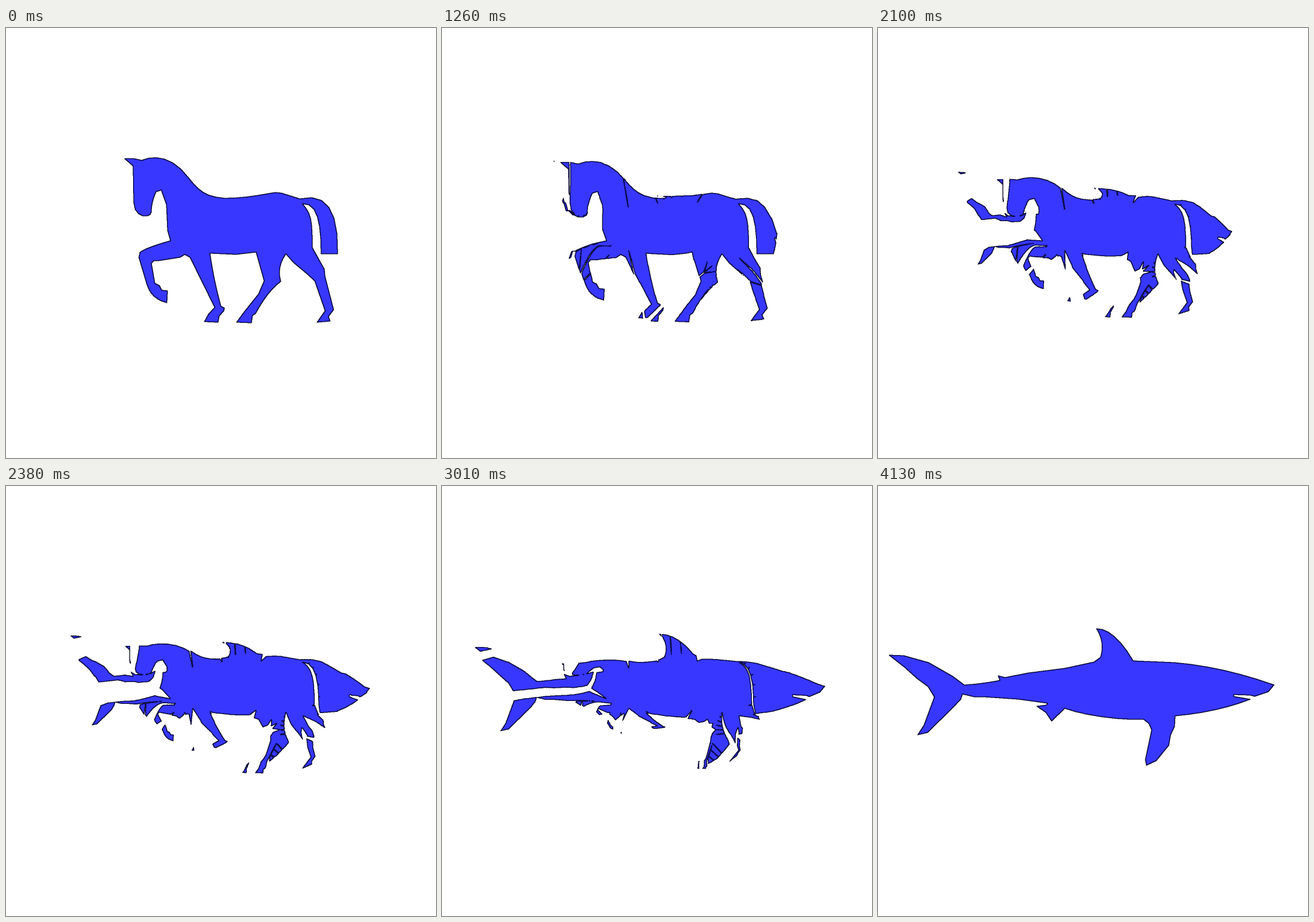
Recreate the animation shown at these times as an HTML page with a canvas. Size 748x748 px, loop 4830 ms.

```html
<!DOCTYPE html>
<html>
<head>
<meta charset="utf-8">
<style>
html, body { margin: 0; width: 100%; height: 100%; overflow: hidden; background: #fff; }
canvas { position: absolute; left: 8px; top: 215px; width: 692px; height: 306px; }
</style>
</head>
<body>
<canvas id="stage" width="1384" height="612"></canvas>
<script>
// Outlines as SVG-style paths in stage pixels
const horseBack = `M206 227 222 227 236 230 C259 220 291 224 318 261 C336 284 347 293 380 296
  C420 296 452 288 469 286 L479 287 511 297 C556 286 579 315 577 393 L548 393
  C548 337 541 304 516 306 C531 323 533 334 533 382`;
const horseHindLegs = `L554 420 555 432 570 490 561 502 564 510 541 512 555 492 537 440 524 428
  500 408 487 393 Q471 415 478 441 Q455 458 434 497 L429 500 427 513 401 512 415 493 439 463
  449 440 435 390 400 394 355 392`;
const horseForelegs = `Q361 436 374 484 L380 487 379 492 371 501 369 512 345 511 352 498 363 486
  320 399 311 394 303 399 265 405 257 405 253 409 259 444 267 448 271 456 281 457 280 478
  Q253 472 245 446 L231 399 233 390 Q246 381 286 370`;
const horseHead = 'L281 352 279 307 270 282 261 285 Q253 303 253 320 C253 331 223 333 222 303 L221 240';
const sharkBack = `M19 294 45 295 88 307 130 331 150 346 Q182 344 212 338 L209 330 221 333 262 325
  325 317 376 306 387 298 Q395 272 380 248 Q411 248 444 304 L515 307 Q600 314 689 346`;
const sharkBelly = `L679 358 655 366 648 364 619 363 619 366 648 371 Q588 394 517 400
  L516 418 509 433 506 451 484 478 467 486 465 476 476 424 471 413 462 406
  C420 408 358 399 325 387 L302 409 292 394 276 383 293 381 295 378 244 371 185 367 168 367 147 362`;
const sharkTail = 'L144 371 130 386 86 429 69 433 80 416 98 367 87 349 68 335 47 316';

const SCALE = 2, LEFT = 8, TOP = 215, TILE = 16, FACETS = 6;
const ctx = stage.getContext('2d', { willReadFrequently: true });
const W = stage.width, H = stage.height;

const rgb = (r, g, b) => (255 << 24 | b << 16 | g << 8 | r) >>> 0;
const WHITE = rgb(255, 255, 255), BLUE = rgb(55, 55, 255);
const LINE_IN = rgb(5, 5, 75), LINE_OUT = rgb(35, 35, 45);

// Point of a Bezier curve of any degree
function bezier(pts, u) {
  if (pts.length === 1) return pts[0];
  const next = pts.slice(1).map(([x, y], i) =>
    [pts[i][0] + (x - pts[i][0]) * u, pts[i][1] + (y - pts[i][1]) * u]);
  return bezier(next, u);
}

// Path text to grid points, with every curve cut into facets
function flatten(path) {
  const out = [];
  for (const [part] of path.matchAll(/[MLQC][^MLQC]*/g)) {
    const nums = part.match(/\d+/g).map(Number), pts = [];
    for (let i = 0; i < nums.length; i += 2)
      pts.push([(nums[i] - LEFT) * SCALE - .5, (nums[i + 1] - TOP) * SCALE - .5]);
    if ('ML'.includes(part[0])) out.push(...pts);
    else {
      const curve = [out.at(-1), ...pts];
      for (let k = 1; k <= FACETS; k++) out.push(bezier(curve, k / FACETS));
    }
  }
  return out;
}

// Closest point to (x, y) on a segment: [x, y, squared distance]
function closest([x1, y1, x2, y2], x, y) {
  const dx = x2 - x1, dy = y2 - y1;
  const u = Math.max(0, Math.min(1, ((x - x1) * dx + (y - y1) * dy) / (dx * dx + dy * dy)));
  const cx = x1 + u * dx, cy = y1 + u * dy;
  return [cx, cy, (x - cx) ** 2 + (y - cy) ** 2];
}

// Grid of inside flags and nearest outline points
function makeShape(path) {
  const pts = flatten(path);
  const sides = pts.map((p, i) => [...p, ...pts[(i + 1) % pts.length]]);

  ctx.clearRect(0, 0, W, H);
  ctx.beginPath();
  for (const [x, y] of pts) ctx.lineTo(x + .5, y + .5);
  ctx.fill();
  const inside = new Uint8Array(W * H), data = ctx.getImageData(0, 0, W, H).data;
  for (let i = 0; i < W * H; i++) inside[i] = data[i * 4 + 3] > 127 ? 1 : 0;

  const nx = new Float32Array(W * H), ny = new Float32Array(W * H);
  for (let ty = 0; ty < H; ty += TILE) for (let tx = 0; tx < W; tx += TILE) {
    // Only sides that can be nearest somewhere in this tile
    const dist = sides.map(s => Math.sqrt(closest(s, tx + TILE / 2, ty + TILE / 2)[2]));
    const limit = Math.min(...dist) + TILE * 1.5;
    const near = sides.filter((s, i) => dist[i] <= limit);
    for (let y = ty; y < Math.min(H, ty + TILE); y++)
      for (let x = tx; x < Math.min(W, tx + TILE); x++) {
        let best = Infinity;
        const i = y * W + x;
        for (const s of near) {
          const c = closest(s, x, y);
          if (c[2] < best) { best = c[2]; nx[i] = c[0]; ny[i] = c[1]; }
        }
      }
  }
  return { inside, nx, ny };
}

const horse = makeShape(horseBack + horseHindLegs + horseForelegs + horseHead);
const shark = makeShape(sharkBack + sharkBelly + sharkTail);
const CORE = 1, FROM_HORSE = 2, FROM_SHARK = 4;
const mask = new Uint8Array(W * H);
const image = ctx.createImageData(W, H), pixels = new Uint32Array(image.data.buffer);

// Every point of `from` has gone the share s of its way to the nearest point of `to`
function addPieces(from, to, s, bit) {
  const grow = 1 / (1 - s);
  for (let y = 0, i = 0; y < H; y++) for (let x = 0; x < W; x++, i++) {
    if (to.inside[i]) continue;
    const bx = to.nx[i], by = to.ny[i];
    const ax = Math.round(bx + (x - bx) * grow), ay = Math.round(by + (y - by) * grow);
    if (!(ax >= 0 && ax < W && ay >= 0 && ay < H)) continue;
    const j = ay * W + ax;
    if (from.inside[j] && Math.hypot(to.nx[j] - bx, to.ny[j] - by) < 1) mask[i] |= bit;
  }
}

// Hairline gap between two neighbouring cells that head for different places
function split(i, j, t) {
  if (mask[i] !== mask[j] || mask[i] !== FROM_HORSE && mask[i] !== FROM_SHARK) return false;
  const [to, s] = mask[i] === FROM_HORSE ? [shark, t] : [horse, 1 - t];
  const jump = Math.hypot(to.nx[i] - to.nx[j], to.ny[i] - to.ny[j]);
  return jump > 1.2 && jump * s > .12;
}

function draw(t) {
  for (let i = 0; i < W * H; i++) mask[i] = horse.inside[i] & shark.inside[i] ? CORE : 0;
  addPieces(horse, shark, t, FROM_HORSE);
  addPieces(shark, horse, 1 - t, FROM_SHARK);
  for (let i = 0; i < W * H; i++) pixels[i] = mask[i] ? BLUE : WHITE;

  for (let y = 1; y < H - 1; y++) for (let x = 1; x < W - 1; x++) {
    const i = y * W + x;
    if (!mask[i]) continue;
    const edge = !mask[i - 1] || !mask[i + 1] || !mask[i - W] || !mask[i + W];
    if (!edge && !split(i, i + 1, t) && !split(i, i + W, t)) continue;
    for (let dy = -W; dy <= W; dy += W) for (let dx = -1; dx <= 1; dx++) {
      const j = i + dy + dx;
      pixels[j] = mask[j] ? LINE_IN : LINE_OUT;
    }
  }
  ctx.putImageData(image, 0, 0);
}

const HOLD = 700, STEP = 70, STEPS = 50, LOOP = 4830;
let shown = -1;

function tick() {
  const now = performance.now() % LOOP;
  const step = now < HOLD ? 0 : Math.min(STEPS, Math.floor((now - HOLD) / STEP) + 1);
  if (step !== shown) {
    const u = step / STEPS;
    draw(u < .5 ? 2 * u * u : 1 - 2 * (1 - u) ** 2);
    shown = step;
  }
  requestAnimationFrame(tick);
}
tick();
</script>
</body>
</html>
```
